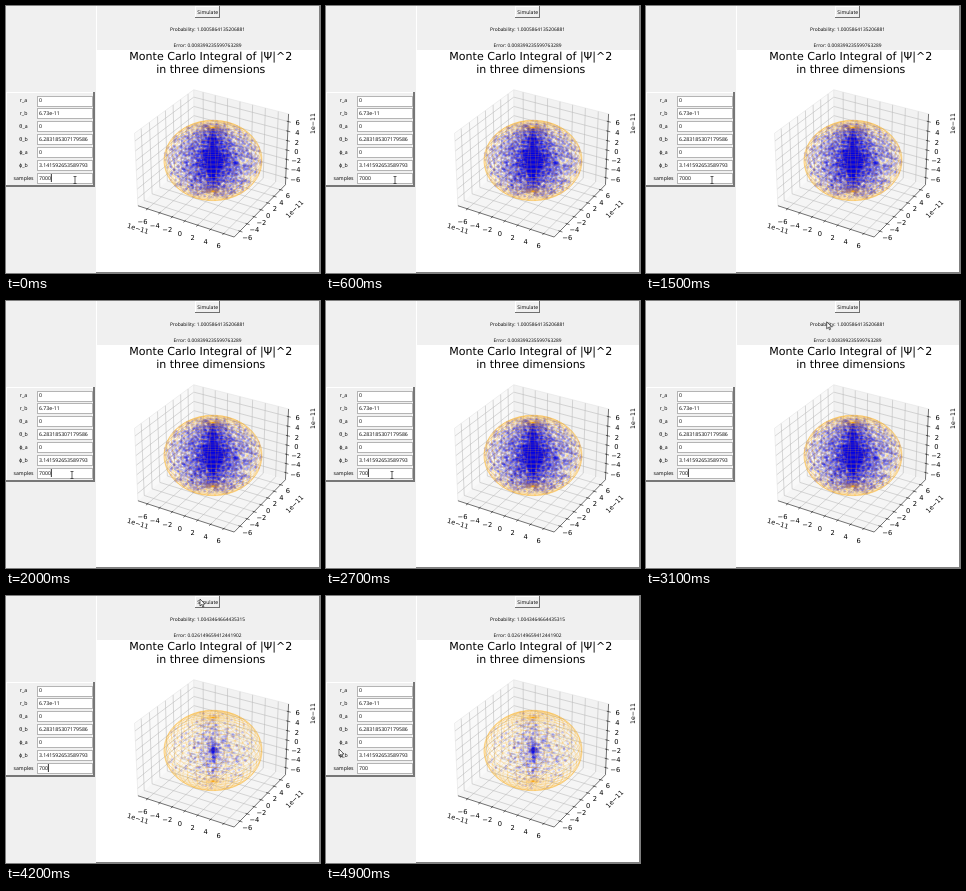
Recreate the animation shown at these times as an HTML page with a canvas. Size 314 by 267 pixels, loop 5 s.

```html
<!DOCTYPE html>
<html lang="en">
<head>
<meta charset="utf-8">
<title>Monte Carlo integral</title>
<style>
  html, body { margin: 0; width: 100%; height: 100%; overflow: hidden; background: #f0f0f0; }
  canvas { display: block; }
</style>
</head>
<body>
<canvas id="stage" width="314" height="267"></canvas>
<script>
const W = 314, H = 267, LOOP = 5000;
const UI = '"Open Sans", sans-serif', PLOT = '"DejaVu Sans", sans-serif';
const stage = document.getElementById('stage').getContext('2d');

function text(g, str, x, y, size, font, align = 'center', angle = 0) {
  g.save();
  g.translate(x, y);
  g.rotate(angle * Math.PI / 180);
  g.font = `${size}px ${font}`;
  g.textRendering = 'geometricPrecision';
  g.textAlign = align;
  g.fillStyle = '#000';
  g.fillText(str, 0, size * 0.36);
  g.restore();
}

function rect(g, x, y, w, h, color) {
  g.fillStyle = color;
  g.fillRect(x, y, w, h);
}

function path(g, points, color, width, fill) {
  g.beginPath();
  points.forEach(([x, y]) => g.lineTo(x, y));
  if (fill) { g.fillStyle = fill; g.fill(); }
  if (color) { g.strokeStyle = color; g.lineWidth = width; g.stroke(); }
}

// Perspective view of the unit box: elevation 30°, azimuth -60°.
function project(x, y, z) {
  const bx = x * 0.5714, by = y * 0.5714, bz = z * 0.4286;
  const scale = 965 / (10 - 0.433 * bx + 0.75 * by - 0.5 * bz);
  return [
    207 + scale * (0.866 * bx + 0.5 * by),
    154 - scale * (-0.25 * bx + 0.433 * by + 0.866 * bz)
  ];
}
const line3 = (g, a, b, color, width) => path(g, [project(...a), project(...b)], color, width);

const LIMIT = 7.57, RADIUS = 6.73 / LIMIT;
function onSphere(r, theta, phi) {
  return [r * Math.sin(phi) * Math.cos(theta), r * Math.sin(phi) * Math.sin(theta), r * Math.cos(phi)];
}

function drawAxes(g) {
  const pane = (corners, color) => path(g, corners.map(c => project(...c)), null, 0, color);
  pane([[-1, -1, -1], [-1, 1, -1], [-1, 1, 1], [-1, -1, 1]], '#f9f9f9');
  pane([[-1, 1, -1], [1, 1, -1], [1, 1, 1], [-1, 1, 1]], '#f2f2f2');
  pane([[-1, -1, -1], [1, -1, -1], [1, 1, -1], [-1, 1, -1]], '#f5f5f5');
  const ticks = [-6, -4, -2, 0, 2, 4, 6];
  for (const value of ticks) {
    const t = value / LIMIT;
    const grid = points => path(g, points.map(p => project(...p)), '#b8b8b8', 0.55);
    grid([[t, -1, -1], [t, 1, -1], [t, 1, 1]]);
    grid([[1, t, -1], [-1, t, -1], [-1, t, 1]]);
    grid([[1, 1, t], [-1, 1, t], [-1, -1, t]]);
  }
  const edges = [[-1, -1, 1], [-1, 1, 1], [1, 1, 1]].map(p => project(...p));
  path(g, edges, '#dedede', 0.5);
  line3(g, [-1, 1, -1], [-1, 1, 1], '#dedede', 0.5);
  line3(g, [-1, -1, -1], [-1, -1, 1], '#dedede', 0.5);
  line3(g, [-1, -1, -1], [1, -1, -1], '#000', 0.55);
  line3(g, [1, -1, -1], [1, 1, -1], '#000', 0.55);
  line3(g, [1, 1, -1], [1, 1, 1], '#000', 0.55);
  for (const value of ticks) {
    const t = value / LIMIT, label = String(value).replace('-', '\u2212');
    const tick = (from, to, at, dx, dy) => {
      line3(g, from, to, '#000', 0.55);
      const [x, y] = project(...at);
      text(g, label, x + dx, y + dy, 6.7, PLOT);
    };
    tick([t, -1.05, -1], [t, -0.97, -1], [t, -1, -1], -5, 12.3);
    tick([1.05, t, -1], [0.97, t, -1], [1, t, -1], 7.3, 6);
    tick([1.05, 1, t], [0.97, 1, t], [1, 1, t], 9.5, 1.5);
  }
  text(g, '1e\u221211', 132, 222.5, 6.5, PLOT, 'center', 17);
  text(g, '1e\u221211', 288.5, 203, 6.5, PLOT, 'center', -46);
  text(g, '1e\u221211', 307, 117.5, 6.2, PLOT, 'center', -90);
}

function drawSphere(g) {
  const curve = at => path(g, Array.from({ length: 61 }, (_, i) => project(...at(i / 60))),
    'rgba(255,165,0,.32)', 0.6);
  for (let i = 0; i < 32; i++) curve(s => onSphere(RADIUS, i * Math.PI / 16, s * Math.PI));
  for (let i = 1; i < 28; i++) curve(s => onSphere(RADIUS, s * 2 * Math.PI, i * Math.PI / 28));
}

function seededRandom(seed) {
  return () => {
    seed = (seed + 0x6D2B79F5) | 0;
    let n = Math.imul(seed ^ seed >>> 15, 1 | seed);
    n = n + Math.imul(n ^ n >>> 7, 61 | n) ^ n;
    return ((n ^ n >>> 14) >>> 0) / 4294967296;
  };
}

function drawSamples(g, count) {
  const random = seededRandom(count);
  for (let i = 0; i < count; i++) {
    const p = onSphere(RADIUS * random(), 2 * Math.PI * random(), Math.PI * random());
    const nearness = 0.43 * p[0] - 0.75 * p[1] + 0.4 * p[2];
    const [x, y] = project(...p);
    g.fillStyle = `rgba(0,0,235,${0.16 + 0.08 * nearness})`;
    g.beginPath();
    g.arc(x, y, 1.25, 0, 7);
    g.fill();
  }
}

function drawWindows(g) {
  rect(g, 0, 0, W, H, '#f0f0f0');
  rect(g, 90, 0, 1, H, '#fff');
  rect(g, 91, 44, 222, 222, '#fff');
  rect(g, 313, 0, 1, H, '#808080');
  rect(g, 90, 266, 224, 1, '#808080');

  rect(g, 189, 0, 25, 12, '#707070');
  rect(g, 189, 0, 24, 11, '#fff');
  rect(g, 190, 1, 23, 10, '#f0f0f0');
  text(g, 'Simulate', 201.7, 6.3, 5.1, UI);

  rect(g, 0, 86, 89, 95, '#777');
  rect(g, 0, 86, 87, 93, '#fff');
  rect(g, 1, 87, 86, 92, '#f0f0f0');
  const fields = [
    ['r_a', '0'], ['r_b', '6.73e-11'], ['θ_a', '0'], ['θ_b', '6.283185307179586'],
    ['ϕ_a', '0'], ['ϕ_b', '3.141592653589793'], ['samples', '']
  ];
  fields.forEach(([label, value], i) => {
    const y = 94.5 + i * 12.9, top = Math.round(y - 5);
    text(g, label, 17.5, y, 5.2, UI);
    rect(g, 31, top, 56, 11, '#b4b4b4');
    rect(g, 32, top + 1, 54, 9, '#fff');
    text(g, value, 33, y, 5.2, UI, 'left');
  });
}

function makeScene(count, probability, error) {
  const canvas = document.createElement('canvas');
  canvas.width = W;
  canvas.height = H;
  const g = canvas.getContext('2d');
  drawWindows(g);
  text(g, 'Probability: ' + probability, 201.5, 23.2, 4.85, UI);
  text(g, 'Error: ' + error, 201.5, 39.7, 4.85, UI);
  text(g, 'Monte Carlo Integral of |Ψ|^2', 204.8, 50.5, 11.04, PLOT);
  text(g, 'in three dimensions', 204.8, 63.5, 11.04, PLOT);
  drawAxes(g);
  drawSamples(g, count);
  drawSphere(g);
  return canvas;
}

function drawCursor(g, x, y) {
  if (x > 32 && x < 87 && y > 166) {
    path(g, [[x - 1.5, y - 3.5], [x + 1.5, y - 3.5]], '#222', 0.7);
    path(g, [[x, y - 3.5], [x, y + 3.5]], '#222', 0.7);
    path(g, [[x - 1.5, y + 3.5], [x + 1.5, y + 3.5]], '#222', 0.7);
    return;
  }
  const arrow = [[0, 0], [0, 7], [1.7, 5.5], [2.8, 8], [3.9, 7.5], [2.8, 5.2], [4.9, 5], [0, 0]];
  path(g, arrow.map(([dx, dy]) => [x + dx, y + dy]), '#000', 0.6, '#fff');
}

// Pointer stops: time, x, y.
const stops = [[0, 69, 174], [600, 69, 174], [900, 66, 174], [2700, 66, 174],
  [3200, 194, 3], [4200, 194, 3], [4900, 13, 153], [LOOP, 13, 153]];
function pointerAt(t) {
  const i = stops.findIndex(s => t < s[0]);
  const [t0, x0, y0] = stops[i - 1], [t1, x1, y1] = stops[i];
  const s = (t - t0) / (t1 - t0), e = s * s * (3 - 2 * s);
  return [x0 + (x1 - x0) * e, y0 + (y1 - y0) * e];
}

const caretSpans = [[0, 600], [900, 1500], [1800, 2400], [2700, 3300], [4200, 4800]];
const before = makeScene(7000, '1.0005864135206881', '0.008399235599763289');
const after = makeScene(700, '1.0043464664435315', '0.026149659412441902');

function frame(now) {
  const t = Math.floor((now % LOOP) / 100) * 100;
  stage.drawImage(t < 4200 ? before : after, 0, 0);
  const samples = t < 2700 ? '7000' : '700';
  text(stage, samples, 33, 171.9, 5.2, UI, 'left');
  if (caretSpans.some(([from, to]) => t >= from && t < to)) {
    rect(stage, 33 + samples.length * 2.97, 168, 0.8, 8, '#000');
  }
  drawCursor(stage, ...pointerAt(t));
  requestAnimationFrame(frame);
}
requestAnimationFrame(frame);
</script>
</body>
</html>
```
